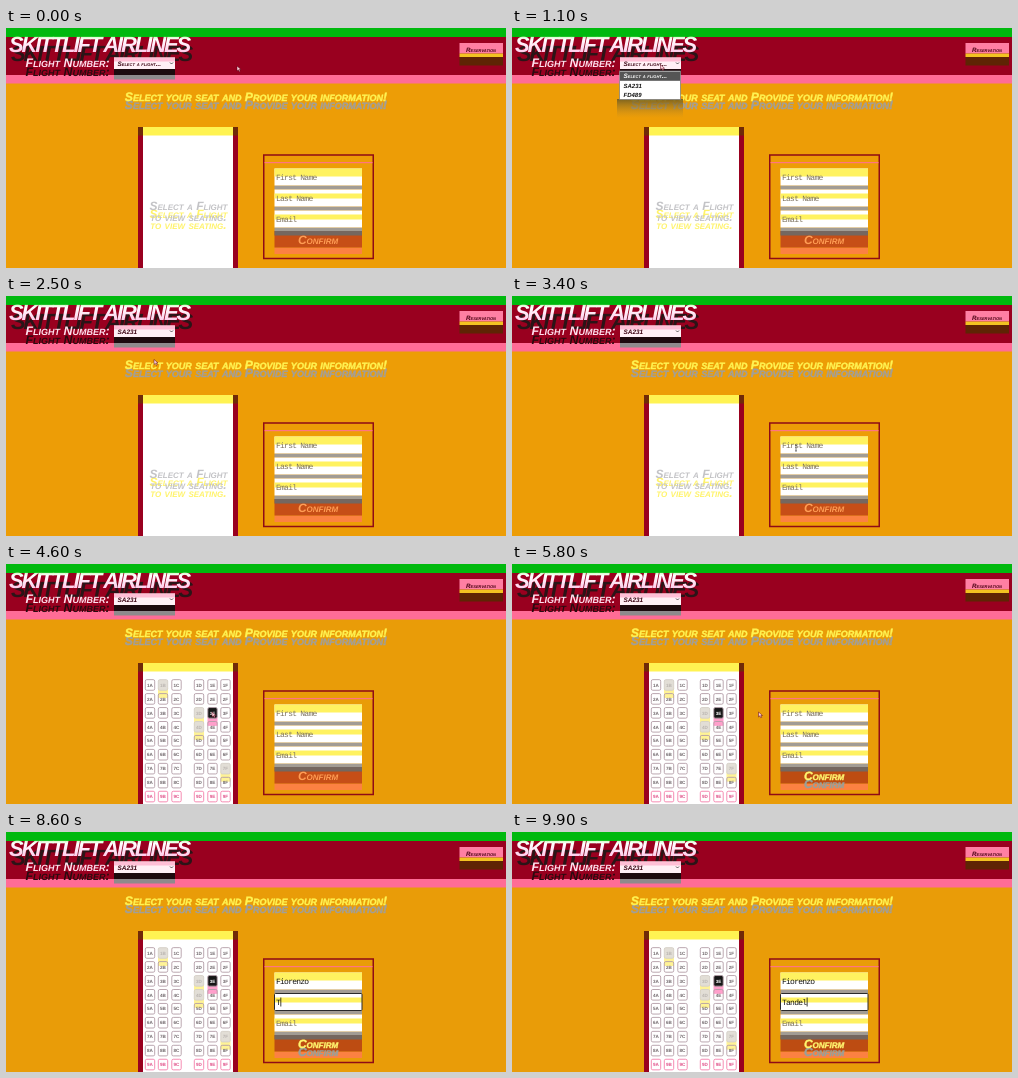
An HTML page for the animation above (10000 ms loop, 500 by 240 pixels).

```html
<!DOCTYPE html>
<html lang="en">
<head>
<meta charset="utf-8">
<title>Seat reservation</title>
<style>
  html, body { margin: 0; width: 100%; height: 100%; overflow: hidden; background: #ec9d06; }
  svg { display: block; width: 500px; height: 240px; }
  text { white-space: pre; text-rendering: geometricPrecision; }
  .marker { font-family: "Liberation Sans", Arial, sans-serif; font-weight: bold; font-style: italic; font-variant: small-caps; }
  .title { letter-spacing: -2.1px; }
  .heavy { stroke-width: .4px; }
  .mono { font: 8px "Liberation Mono", monospace; letter-spacing: -.75px; }
  .seat { font: bold 4.6px "Liberation Sans", Arial, sans-serif; text-anchor: middle; }
  .mid { text-anchor: middle; }
</style>
</head>
<body>
<svg id="stage" viewBox="0 0 500 240" xmlns="http://www.w3.org/2000/svg">
  <defs>
    <linearGradient id="drop" x1="0" y1="0" x2="0" y2="1">
      <stop offset="0" stop-color="#77601f" stop-opacity=".95"/>
      <stop offset="1" stop-color="#b98a2c" stop-opacity="0"/>
    </linearGradient>
    <linearGradient id="brand" gradientUnits="userSpaceOnUse" x1="0" y1="7" x2="0" y2="25">
      <stop offset="0" stop-color="#b9f5a0"/>
      <stop offset=".25" stop-color="#fff"/>
      <stop offset="1" stop-color="#ffc9ea"/>
    </linearGradient>
  </defs>
</svg>
<script>
const LOOP = 10000, STEP = 100;
const OPEN = 1100, PICK = 2200, SEATS = 3600, HOVER = 4500, CLICK = 5200, FOCUS = 6300, NEXT = 8200;
const crimson = '#99001f', yellow = '#fff352', pink = '#ff6c96';
const stage = document.getElementById('stage');

function add(parent, tag, attrs, content) {
  const el = document.createElementNS('http://www.w3.org/2000/svg', tag);
  for (const key in attrs) el.setAttribute(key, attrs[key]);
  if (content) el.textContent = content;
  parent.appendChild(el);
  return el;
}
const group = parent => add(parent, 'g', {});
const box = (parent, x, y, width, height, fill, more) =>
  add(parent, 'rect', { x, y, width, height, fill, ...more });
const marker = (parent, x, y, size, fill, content, cls = '') =>
  add(parent, 'text', {
    x, y, fill, 'font-size': size, class: 'marker ' + cls,
    stroke: cls.includes('heavy') ? fill : 'none'
  }, content);
const show = (el, on) => el.setAttribute('display', on ? 'inline' : 'none');

// Page and header
const page = box(stage, 0, 0, 500, 240, '#ec9d06');
box(stage, 0, 0, 500, 9, '#00b90e');
box(stage, 0, 9, 500, 38, crimson);
box(stage, 0, 47, 500, 8.5, pink);
const brand = 'SKITTLIFT AIRLINES';
marker(stage, 5, 33, 22, '#2b1417', brand, 'title');
marker(stage, 3, 24, 22, 'url(#brand)', brand, 'title');
marker(stage, 19.5, 47.5, 12.4, '#2b0a10', 'Flight Number:');
marker(stage, 19.5, 38.5, 12.4, '#ffe0ee', 'Flight Number:');

// Flight picker
box(stage, 108, 41, 61, 6, '#1d0a0e');
box(stage, 108, 47, 61, 4.5, '#8f8a8c');
box(stage, 108, 29.5, 61, 11.5, '#fff0f6');
box(stage, 108, 29.5, 61, 4, '#ffbfd6');
const picked = marker(stage, 111.5, 38, 6.4, '#3a0010', 'Select a flight...');
add(stage, 'path', { d: 'M164 34.5l1.5 1.5l1.5-1.5', fill: 'none', stroke: '#333', 'stroke-width': .8 });

// Reservation button
box(stage, 453.5, 29, 43.5, 8.5, '#5e2404');
box(stage, 453.5, 15, 43.5, 10.5, '#ff7fa3');
box(stage, 453.5, 25.5, 43.5, 3.5, '#f2c321');
marker(stage, 475, 24, 6.3, '#4a0012', 'Reservation', 'mid');

// Heading
const heading = 'Select your seat and Provide your information!';
marker(stage, 250, 81, 12.2, '#a19f9a', heading, 'mid heavy');
marker(stage, 250, 73, 12.2, yellow, heading, 'mid heavy');

// Cabin
box(stage, 132, 99, 100, 141, crimson);
box(stage, 132, 99, 100, 8.5, '#702a08');
box(stage, 137, 99, 90, 141, '#fff');
box(stage, 137, 99, 90, 8.5, yellow);
const hint = group(stage);
const hintLines = ['Select a Flight', 'to view seating.'];
for (const [dy, fill] of [[8.5, '#fff36a'], [0, '#c3c3c6']])
  hintLines.forEach((line, i) => marker(hint, 182.5, 181.5 + i * 11 + dy, 12, fill, line, 'mid'));

const cabin = group(stage);
const columns = [144, 157, 170.5, 193, 206.5, 219.5];
const taken = ['1B', '3D', '4D', '7F'];
const rowY = row => 107 + row * 13.95;
let chosen, chosenLabel, chosenShade;
const eachSeat = draw => {
  for (let row = 1; row <= 9; row++)
    columns.forEach((x, i) => draw(row + 'ABCDEF'[i], x, rowY(row), row));
};
eachSeat((name, x, y) => {
  if (taken.includes(name)) box(cabin, x - 5, y + 3, 10, 10, '#fff396');
  if (name === '3E') chosenShade = box(cabin, x - 5, y + 4, 10, 9, '#ff9fcb');
});
eachSeat((name, x, y, row) => {
  const gone = taken.includes(name), last = row === 9;
  const seat = box(cabin, x - 4.7, y - 5.3, 9.4, 10.6, gone ? '#e2ded6' : 'none', {
    rx: 1.5, 'stroke-width': .9,
    stroke: last ? '#f57fab' : gone ? '#d5d0c8' : '#b49ea8'
  });
  const label = add(cabin, 'text', {
    x, y: y + 1.7, class: 'seat',
    fill: last ? '#e0528a' : gone ? '#b9b4b0' : '#6f666a'
  }, name);
  if (name === '3E') [chosen, chosenLabel] = [seat, label];
});

// Form
box(stage, 257.75, 127, 109.5, 103.5, 'none', { stroke: '#8f0b16', 'stroke-width': 1.5 });
box(stage, 258.5, 134, 108, 1.2, '#ff7580');
const fields = [
  { y: 140.5, band: 140.5, depth: 8, hint: 'First Name', value: 'Fiorenzo' },
  { y: 161.5, band: 165.5, depth: 5, hint: 'Last Name', value: 'Tandel' },
  { y: 182.5, band: 186.5, depth: 5, hint: 'Email', value: '' }
];
for (const f of fields) {
  box(stage, 268.5, f.y + 17, 87.5, 4, '#a29c94');
  box(stage, 268.5, f.y, 87.5, 17, '#fff');
  box(stage, 268.5, f.band, 87.5, f.depth, '#fff260');
  f.ring = box(stage, 268.5, f.y, 87.5, 17, 'none', { rx: 1, stroke: '#2a2a2a' });
  f.text = add(stage, 'text', { x: 270, y: f.y + 11, class: 'mono' });
}
const caret = box(stage, 0, 0, .8, 9, '#111');

box(stage, 268.5, 219.5, 87.5, 6.5, '#fc8142');
const confirm = box(stage, 268.5, 203, 87.5, 16.5, '#c64e17');
box(stage, 268.5, 203, 87.5, 4.5, '#75675f');
const confirmShade = marker(stage, 312, 224, 12, '#98a09a', 'Confirm', 'mid heavy');
const confirmDim = marker(stage, 312, 215.5, 12, '#ff9d54', 'Confirm', 'mid');
const confirmLit = marker(stage, 312, 215.5, 12, '#fff56e', 'Confirm', 'mid heavy');

// Open list
const list = group(stage);
box(list, 105, 71, 66, 19, 'url(#drop)');
box(list, 107.5, 43, 61, 28.5, '#fff', { stroke: '#777', 'stroke-width': .7 });
const hover = box(list, 108, 53, 60, 9.2, '#555');
const options = ['Select a flight...', 'SA231', 'FD489'].map((name, i) =>
  marker(list, 111.5, 50.3 + i * 9.2, i ? 6 : 6.4, '#111', name));

// Pointer
const arrow = add(stage, 'path', {
  d: 'M0 0v5l1.3-1.2l1 2l.9-.5l-.9-1.8h1.7z', fill: '#ffd3de', stroke: '#5a0014', 'stroke-width': .5
});
const beam = add(stage, 'path', { d: 'M-1-3h2M0-3v6M-1 3h2', fill: 'none', stroke: '#444', 'stroke-width': .7 });
const route = [
  [0, 231, 38], [900, 150, 36], [1200, 148, 37], [1700, 135, 55], [2300, 135, 55],
  [3400, 284, 152], [3600, 284, 152], [4500, 206, 148], [5400, 206, 148], [6200, 287, 148], [LOOP, 287, 148]
];

function pointerAt(t) {
  const i = route.findIndex((p, k) => k && t <= p[0]);
  const [t0, x0, y0] = route[i - 1], [t1, x1, y1] = route[i];
  const u = (t - t0) / (t1 - t0), e = u * u * (3 - 2 * u);
  return [x0 + (x1 - x0) * e, y0 + (y1 - y0) * e];
}

const typed = (t, start, pace, word) =>
  t < start ? '' : word.slice(0, Math.floor((t - start) / pace) + 1);

function render(t) {
  const seated = t >= SEATS, ready = t >= CLICK;
  page.setAttribute('fill', seated ? '#e99c08' : '#ed9d06');
  picked.textContent = t < PICK ? 'Select a flight...' : 'SA231';
  show(hint, !seated);
  show(cabin, seated);

  const dark = t >= HOVER;
  chosen.setAttribute('fill', dark ? '#161616' : 'none');
  chosenLabel.setAttribute('fill', dark ? '#fff' : '#6f666a');
  show(chosenShade, dark);

  confirm.setAttribute('fill', ready ? '#bd4c12' : '#c64e17');
  show(confirmShade, ready);
  show(confirmLit, ready);
  show(confirmDim, !ready);

  const [x, y] = pointerAt(t);
  const overForm = x > 269 && x < 356 && y > 140 && y < 199;
  for (const el of [arrow, beam]) el.setAttribute('transform', `translate(${x} ${y})`);
  show(arrow, !overForm);
  show(beam, overForm && t < 7700);

  show(list, t >= OPEN && t < PICK);
  const row = y < 53 ? 0 : 1;
  hover.setAttribute('y', 43.6 + row * 9.2);
  options.forEach((el, i) => el.setAttribute('fill', i === row ? '#fff' : '#111'));

  const active = t < FOCUS ? -1 : t < NEXT ? 0 : 1;
  const values = [typed(t, 6800, 150, fields[0].value), typed(t, 8500, 230, fields[1].value), ''];
  fields.forEach((f, i) => {
    f.text.textContent = values[i] || f.hint;
    f.text.setAttribute('fill', values[i] ? '#111' : '#7d725f');
    show(f.ring, i === active);
  });
  show(caret, active >= 0);
  if (active >= 0) {
    caret.setAttribute('x', 270.4 + values[active].length * 4.05);
    caret.setAttribute('y', fields[active].y + 4);
  }
}

function tick() {
  render(Math.floor(performance.now() % LOOP / STEP) * STEP);
  requestAnimationFrame(tick);
}
tick();
</script>
</body>
</html>
```
